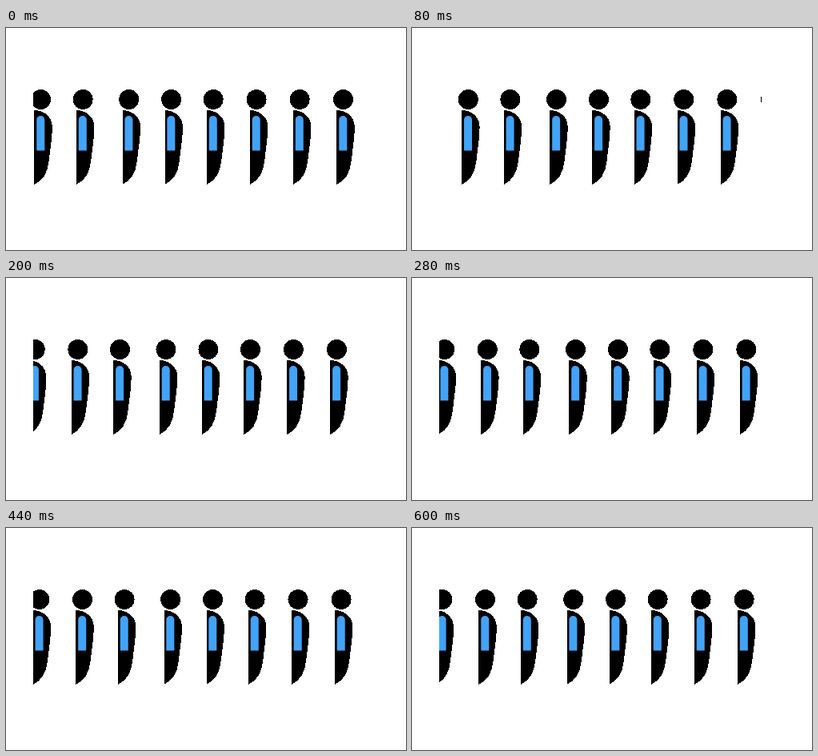
An HTML page for the animation above (2420 ms loop, 500 by 278 pixels).

```html
<!DOCTYPE html>
<html lang="en">
<head>
<meta charset="utf-8">
<title>Sliding row of people</title>
<style>
  html, body { margin: 0; width: 100%; height: 100%; overflow: hidden; background: #fff; }
  svg { display: block; width: 500px; height: 278px; }
</style>
</head>
<body>
<svg viewBox="0 0 500 278">
  <defs>
    <clipPath id="window"><rect x="34" y="77" width="403" height="119"/></clipPath>
    <g id="person">
      <g shape-rendering="crispEdges">
        <circle cx="8.1" cy="89.5" r="12.5"/>
        <path d="M0 103C10 103 22.4 109.5 22.4 124C22.4 138 19.7 152 18.3 166C16.6 183 10 191 0 196Z"/>
      </g>
      <path d="M2.8 153.5V115a5 5 0 0 1 10 0V153.5Z" fill="#42a3f7"/>
    </g>
  </defs>
  <g clip-path="url(#window)"><g id="row"></g></g>
</svg>
<script>
  const LOOP = 2420, STEP = 20, PEAK = 420, END = 600;
  const REACH = 52, RETREAT = 4;
  const places = [-18.2, 35.45, 88, 145.6, 198.55, 251, 304.95, 359, 413.47];
  const row = document.getElementById('row');

  for (const x of places) {
    const use = document.createElementNS('http://www.w3.org/2000/svg', 'use');
    use.setAttribute('href', '#person');
    use.setAttribute('x', x);
    row.append(use);
  }

  // Ease out to the right, then drift back until the row rests.
  function offset(t) {
    if (t < PEAK) return REACH * (1 - Math.pow(1 - t / PEAK, 3.42));
    const back = (Math.min(t, END) - PEAK) / (END - PEAK);
    return REACH - RETREAT * back * back;
  }

  const start = performance.now();

  function draw(now) {
    const t = Math.max(0, now - start) % LOOP;
    const x = offset(Math.floor(t / STEP) * STEP);
    row.setAttribute('transform', `translate(${x.toFixed(2)} 0)`);
    requestAnimationFrame(draw);
  }
  draw(start);
</script>
</body>
</html>
```
